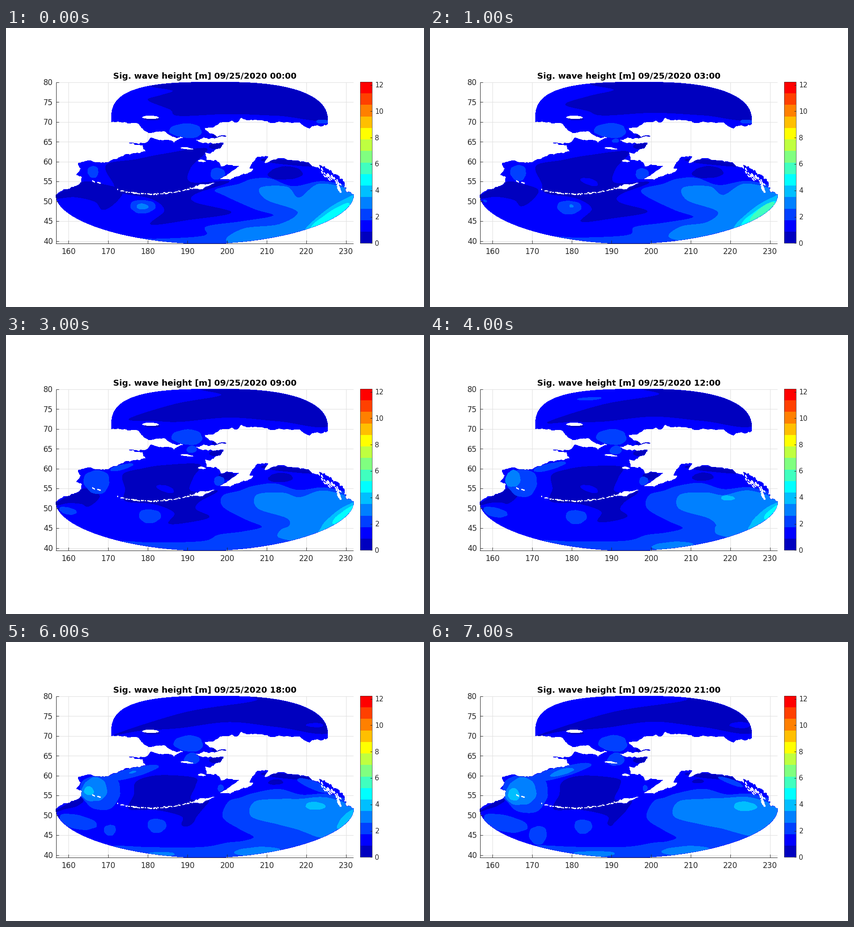
Write a matplotlib script that moves like this. It is 917 px wide and 611 px high and loops after 8000 ms.

```python
import numpy as np
import matplotlib.pyplot as plt
from matplotlib.animation import FuncAnimation
from matplotlib.patches import Polygon, Rectangle
from matplotlib.path import Path

W, H, DPI = 917, 611, 100
INK, GRID = (0.15,) * 3, (0.87,) * 3
LAST = 21
TAU = 2 * np.pi
JET = [np.clip([k - 6, min(k - 2, 14 - k), min(k + 2, 10 - k)], 0, 4) / 4 for k in range(1, 15)]
rng = np.random.default_rng(7)


def points(flat):
    return np.reshape(flat, (-1, 2)).astype(float)


def spline(p, n=8):
    """Closed Catmull-Rom curve."""
    a, b, c, d = (np.roll(p, k, axis=0) for k in (1, 0, -1, -2))
    t = np.arange(n)[:, None, None] / n
    s = b + 0.5 * t * (c - a + t * (2*a - 5*b + 4*c - d + t * (3*(b - c) + d - a)))
    return s.transpose(1, 0, 2).reshape(-1, 2)


def coast(flat, amp=0.11, rounds=4):
    """Rough shoreline by random midpoint displacement."""
    p = points(flat)
    for _ in range(rounds):
        d = np.diff(p, axis=0)
        mid = p[:-1] + d / 2 + d[:, ::-1] * [-1, 1] * rng.normal(0, amp, (len(d), 1))
        p = np.vstack([np.stack([p[:-1], mid], 1).reshape(-1, 2), p[-1:]])
    return p


def arc(x, y, rx, ry, power, a0, a1):
    """Part of a superellipse, angles in quarter turns."""
    a = np.linspace(a0, a1, 60) * TAU / 4
    c, s = np.cos(a), np.sin(a)
    e = 2 / power
    return np.column_stack([x + rx * np.sign(c) * abs(c) ** e, y + ry * np.sign(s) * abs(s) ** e])


def ellipse(x, y, rx, ry, shear=0.0, wobble=0.0, phase=0.0):
    a = np.linspace(0, TAU, 48, endpoint=False)
    r = 1 + wobble * (np.sin(2 * a + phase) + np.sin(3 * a + 2 * phase) + 0.4 * np.sin(7 * a))
    u = rx * r * np.cos(a)
    return np.column_stack([x + u, y + ry * r * np.sin(a) + shear * u])


# Sea outline, clockwise from the north-west
dome = np.vstack([arc(469, 206, 238, 87.5, 3.05, 2, 3), arc(469, 207, 237, 88.5, 2.5, 3, 4)])
arctic_shore = coast([706, 209, 690, 215, 600, 204, 550, 201, 517, 196, 475, 205, 432, 219,
                      445, 230, 483, 237, 432, 240, 416, 246, 432, 253, 477, 252, 470, 263,
                      437, 272, 440, 290, 460, 289, 470, 304, 511, 302])
peninsula = coast([511, 302, 478, 325, 445, 341, 408, 354, 452, 342, 505, 326, 532, 312,
                   538, 300, 575, 282, 566, 295, 602, 285, 645, 293, 682, 306], 0.09)
fjords = coast([682, 306, 692, 311, 687, 301, 701, 308, 718, 322, 742, 338, 741, 349, 762, 364], 0.2)
limb = np.minimum(arc(436, 367, 326.5, 105.5, 1.87, 0, 2), [W, 471.5])
asia_shore = coast([109.5, 371, 136, 353, 165, 338, 166, 326, 154, 322, 165, 308, 158, 297,
                    178, 291, 228, 292, 262, 277, 307, 270, 300, 257, 270, 251, 305, 253, 318, 240,
                    368, 252, 398, 242, 368, 238, 345, 225, 290, 209, 231, 206], 0.09)
sea = np.vstack([dome, arctic_shore, peninsula, fjords, limb, asia_shore])

islands = [ellipse(317, 195.5, 17, 3, wobble=0.05), ellipse(396, 263.5, 12, 1.6, 0.1, 0.15),
           ellipse(429, 291, 7, 2, 0, 0.15), ellipse(192, 336, 3, 1, 0.6),
           ellipse(204, 339, 4, 1, 0.4), ellipse(532, 313, 8, 4, -0.6, 0.15),
           ellipse(731, 353, 4, 5, 1, 0.15)]
for x in np.arange(247, 412, 4) + rng.uniform(-2, 2, 42):
    y = 363.5 - 9 * ((x - 320) / 75) ** 2 + rng.normal(0, 0.7)
    islands.append(ellipse(x, y, rng.uniform(0.5, 2.6), rng.uniform(0.4, 1), -0.15, 0.2))
for u in rng.uniform(0, 1, 26):
    x, y = (690, 311) + u * np.array([46, 34]) + rng.normal(0, 3, 2)
    islands.append(ellipse(x, y, rng.uniform(0.6, 2.5), rng.uniform(0.5, 1.3), 0.9, 0.2))

bands = []


def morph(level, start, end):
    """Wave band easing from one outline to another over the whole day."""
    a, b = points(start), points(end)

    def outline(hour):
        s = 1 - (1 - hour / LAST) ** 1.4
        return spline(a + (b - a) * s)
    bands.append((level, outline))


def blob(level, start, end=None, first=0, last=LAST, shear=0.0):
    """Drifting oval (x, y, rx, ry) that is present from first to last hour."""
    a = np.array(start, float)
    b = a if end is None else np.array(end, float)
    phase = rng.uniform(0, TAU)

    def outline(hour):
        if first <= hour <= last:
            s = (hour - first) / max(last - first, 1)
            return ellipse(*(a + (b - a) * s), shear, 0.05, phase)
    bands.append((level, outline))


# Arctic calm
morph(1, [312, 158, 338, 148, 366, 137, 310, 125, 300, 100, 730, 100, 715, 197,
          600, 192, 490, 188, 380, 192, 360, 178],
      [236, 205, 400, 154, 562, 128, 520, 112, 520, 100, 730, 100, 715, 196,
       600, 186, 490, 174, 380, 188, 290, 195])
blob(1, (320, 199, 16, 3))
blob(2, (678, 182, 19, 4), (680, 182, 22, 6), first=18)
blob(3, (350, 139.5, 25, 3), first=12, last=12, shear=-0.05)
blob(3, (695, 205, 14, 4), last=3)

# Bering Strait
blob(3, (395, 225, 36, 15), (402, 222, 32, 17))
blob(3, (407, 247, 7, 4), (408, 257, 18, 14), first=3)
blob(2, (407, 254, 24, 10), last=0)
blob(1, (463, 258, 16, 7))
blob(1, (470, 237, 17, 4))

# Bering Sea calm with its southern lobe
morph(1, [220, 300, 285, 288, 346, 276, 440, 264, 405, 305, 405, 338, 490, 336, 415, 363,
          414, 382, 494, 404, 400, 420, 318, 430, 348, 400, 320, 374, 250, 360, 236, 340],
      [288, 310, 310, 297, 350, 293, 412, 300, 416, 315, 405, 345, 442, 345, 432, 366,
       418, 382, 405, 394, 398, 402, 390, 398, 388, 380, 330, 367, 272, 366, 284, 335])
blob(2, (350, 337, 18, 7), first=3, last=12, shear=0.3)
blob(3, (464, 319, 16, 12), (472, 320, 5, 6))
blob(1, (485, 309, 18, 8), first=6, last=12)

# Kamchatka: calm water giving way to a growing storm
morph(1, [105, 372, 165, 338, 215, 343, 255, 357, 238, 384, 212, 398, 195, 380, 150, 370],
      [105, 373, 165, 338, 164, 342, 163, 348, 158, 352, 150, 357, 142, 361, 125, 366])
blob(3, (191, 315, 12, 12), (210, 330, 52, 41))
blob(3, (245, 291, 14, 4), (286, 285, 62, 12), first=6, shear=-0.25)
blob(4, (182, 315, 16, 18), (200, 328, 33, 30), first=12)
blob(4, (278, 285, 7, 2), (290, 285, 25, 6), first=18, shear=-0.25)
blob(5, (182, 326, 10, 9), (184, 334, 12, 13), first=18)

# Gulf of Alaska
blob(1, (625, 295, 66, 5), shear=0.1)
blob(1, (613, 318, 37, 14), (588, 305, 12, 4))
blob(3, (675, 314, 35, 9), (660, 306, 27, 5), first=18, shear=0.35)

# North Pacific swell
morph(3, [460, 354, 510, 342, 540, 331, 580, 330, 630, 347, 700, 336, 765, 365, 770, 480,
          250, 480, 270, 460, 330, 462, 435, 455, 440, 435, 515, 424, 587, 411, 545, 396, 478, 366],
      [490, 350, 515, 341, 545, 331, 600, 322, 650, 334, 710, 334, 765, 365, 770, 480,
       200, 470, 225, 447, 320, 449, 430, 449, 490, 440, 520, 437, 541, 428, 510, 410, 476, 385])
morph(4, [558, 350, 616, 348, 643, 372, 690, 341, 770, 362, 780, 400, 650, 480, 490, 470,
          520, 440, 600, 430, 640, 402, 572, 376],
      [545, 350, 600, 344, 645, 342, 705, 341, 770, 365, 780, 385, 740, 430, 700, 424,
       672, 417, 640, 408, 595, 399, 536, 382])
blob(4, (536, 463, 45, 10), (565, 458, 52, 11), first=12)
blob(4, (340, 465, 28, 5), (360, 464, 43, 6), first=18)
blob(5, (715, 412, 72, 20), (752, 386, 26, 13), last=18, shear=-0.65)
blob(6, (712, 415, 42, 14), (757, 386, 22, 11), last=12, shear=-0.6)
blob(7, (730, 402, 28, 10), (744, 394, 23, 9), first=3, last=6, shear=-0.7)
blob(5, (653, 357, 14, 5), (691, 360, 24, 10), first=12)

# Small lows in the west
blob(3, (300, 391, 26, 15), (336, 404, 18, 16))
blob(4, (299, 391, 12, 6), (310, 390, 4, 3), last=3)
blob(3, (121, 379, 4, 2), (165, 397, 50, 17), first=3, shear=0.2)
blob(3, (228, 412, 12, 12), (237, 423, 18, 21), first=18)
blob(1, (407, 471, 13, 3), last=6)

plt.rcParams["font.family"] = "DejaVu Sans"
fig = plt.figure(figsize=(W / DPI, H / DPI), dpi=DPI, facecolor="white")
ax = fig.add_axes([0, 0, 1, 1])
ax.set(xlim=(0, W), ylim=(H, 0))
ax.axis("off")


def line(x0, y0, x1, y1, color=INK, z=9):
    ax.plot([x0, x1], [y0, y1], color=color, lw=0.72, zorder=z, solid_capstyle="butt")


def shape(pts, color, z):
    return ax.add_patch(Polygon(pts, fc=color, ec="none", lw=0, zorder=z, antialiased=False))


for k in range(8):
    x = 137.4 + 86.95 * k
    line(x, 118.5, x, 471.5, GRID, 1)
    line(x, 465, x, 471.5)
    ax.text(x, 495, str(160 + 10 * k), size=12, color=INK, ha="center")
for k in range(9):
    y = 466.6 - 43.45 * k
    line(109.5, y, 762, y, GRID, 1)
    line(109.5, y, 116, y)
    ax.text(103, y + 6.2, str(40 + 5 * k), size=12, color=INK, ha="right")
line(109.5, 118.5, 109.5, 472)
line(109, 471.5, 762, 471.5)

bar_x, bar_w, bar_top, bar_base = 777, 26, 118, 471.3
step = (bar_base - bar_top) / len(JET)
for k, color in enumerate(JET, 1):
    ax.add_patch(Rectangle((bar_x, bar_base - step * k), bar_w, step, fc=color, lw=0,
                           antialiased=False))
ax.add_patch(Rectangle((bar_x, bar_top), bar_w, bar_base - bar_top, fill=False, ec=INK, lw=0.5,
                       zorder=3))
for v in range(0, 13, 2):
    y = bar_base - 28.9 * v
    line(bar_x + bar_w - 4, y, bar_x + bar_w, y)
    ax.text(809.5, y + 5.5, str(v), size=10.8, color=INK)

shape(sea, JET[1], 2)
for land in islands:
    shape(land, "white", 8)
title = ax.text(436, 111, "", size=13.27, weight="bold", ha="center", color="black")
shore = Path(sea)
layers = []


def update(i):
    hour = 3 * i
    while layers:
        layers.pop().remove()
    for level, outline in bands:
        pts = outline(hour)
        if pts is not None:
            patch = shape(pts, JET[level - 1], 2 + level / 10)
            patch.set_clip_path(shore, ax.transData)
            layers.append(patch)
    title.set_text(f"Sig. wave height [m] 09/25/2020 {hour:02d}:00")
    return layers + [title]


anim = FuncAnimation(fig, update, frames=8, interval=1000, repeat=True, repeat_delay=0, blit=False)
plt.show()
```
